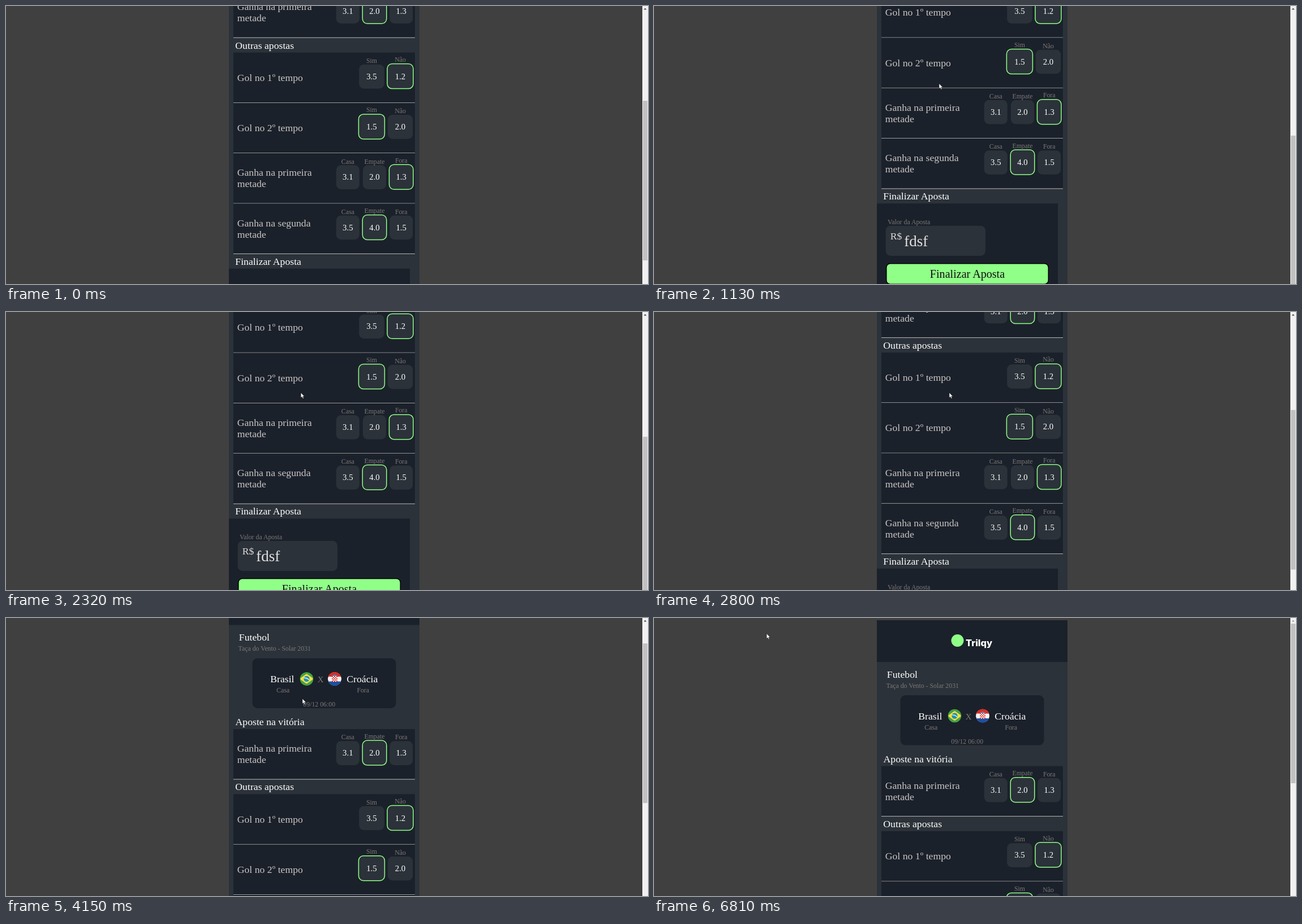
An HTML page for the animation above (6.89 s loop, 1135 px wide and 493 px high).

```html
<!DOCTYPE html>
<html lang="pt">
<head>
<meta charset="utf-8">
<style>
html, body { margin: 0; height: 100%; overflow: hidden; background: #404040; }
svg { display: block; width: 1135px; height: 493px; font-family: "Liberation Serif", "Times New Roman", serif; }
</style>
</head>
<body>
<svg viewBox="0 0 1135 493">
  <defs><clipPath id="disc"><circle r="12"/></clipPath></defs>
  <g id="page"></g>
  <rect x="1125" width="10" height="493" fill="#f1f1f1"/>
  <path id="arrow" d="M1127.5 6.5h5l-2.5-3z"/>
  <rect id="thumb" x="1126" width="8" height="283" fill="#c1c1c1"/>
  <path id="cursor" d="M0 0V9.2L2.1 7.3 3.6 10.6 5.2 9.9 3.7 6.7H6.5Z" fill="#fff" stroke="#111" stroke-width=".6"/>
</svg>
<script>
const $ = id => document.getElementById(id);
const DARK = '#1b212a', SLATE = '#2b3239', WHITE = '#fff', SOFT = '#c9c5c5', DIM = '#7b7878', LIME = '#90ff88', LINE = '#b9b9b9';
const BIG = 17.73, SMALL = 11.8, ODD = 14.78, PITCH = 89.3;
let out = '';

const rect = (x, y, w, h, fill, r = 0, more = '') =>
  out += `<rect x="${x}" y="${y}" width="${w}" height="${h}" rx="${r}" fill="${fill}" ${more}/>`;
const text = (x, y, str, size = BIG, fill = WHITE, anchor = 'start', more = '') =>
  out += `<text x="${x}" y="${y}" font-size="${size}" fill="${fill}" text-anchor="${anchor}" ${more}>${str}</text>`;
const label = (x, y, str) => text(x, y, str, SMALL, DIM, 'middle');
const flag = (x, art) =>
  out += `<g transform="translate(${x} 173.5)" clip-path="url(#disc)">${art}</g>`;

// One bet: title lines on the left, options set from the right edge
function row(top, lines, names, odds, picked) {
  const n = names.length, gap = n === 2 ? 50.6 : 47.2, w = n === 2 ? 44.5 : 41;
  rect(402, top, 321, PITCH - .4, DARK);
  rect(402, top + PITCH - .8, 321, 1, LINE);
  lines.forEach((s, i) => text(408.7, top + 50.2 + 20 * i - 10 * (lines.length - 1), s, BIG, SOFT));
  names.forEach((name, i) => {
    const on = i === picked;
    const x = (n === 2 ? 697 : 698.7) - gap * (n - 1 - i);
    if (on) rect(x - w / 2 - .75, top + 20.1, w + 1.5, 44, SLATE, 8.5, `stroke="${LIME}" stroke-width="1.5"`);
    else rect(x - w / 2, top + 21.2, w, 42.7, SLATE, 8.5);
    label(x, top + (on ? 16.6 : 18.4), name);
    text(x, top + 47.2, odds[i], ODD, WHITE, 'middle');
  });
}

// Header and match card
rect(394, 4, 337, 1000, SLATE);
rect(394, 4, 337, 74, DARK);
out += `<circle cx="536.5" cy="40" r="11" fill="${LIME}"/>`;
text(551, 49.5, 'Trilqy', 16.5, WHITE, 'start', 'font-family="Inter, sans-serif" font-weight="800"');
text(411.8, 106, 'Futebol');
text(410.6, 123.8, 'Taça do Vento - Solar 2031', SMALL, DIM);
rect(435.5, 137, 254, 88.6, DARK, 9);
text(467.2, 180, 'Brasil');
text(602.2, 180, 'Croácia');
text(556.2, 180, 'X', ODD, DIM, 'middle');
label(489.8, 198, 'Casa');
label(631.2, 198, 'Fora');
label(553.7, 223, '09/12 06:00');
flag(531.5, `<circle r="12" fill="#45a247"/>
  <path d="M-9 0L0-6.5 9 0 0 6.5Z" fill="#f6e03c" stroke="#f6e03c" stroke-width="4" stroke-linejoin="round"/>
  <circle r="5.2" fill="#2590b4"/><path d="M-5-1.6Q1-2 4.6 2.3" fill="none" stroke="#e8f4f0" stroke-width="1.3"/>`);
let checks = '';
for (let i = 0; i < 25; i++)
  checks += `<rect x="${i % 5 * 2 - 5}" y="${Math.floor(i / 5) * 2 - 5}" width="2" height="2" fill="${i % 2 ? WHITE : '#e0281f'}"/>`;
flag(581, `<circle r="12" fill="#f4f4f4"/><path d="M-12-12h24v8h-24z" fill="#e0281f"/>
  <path d="M-12 4.5h24V12h-24z" fill="#1d4fa3"/>${checks}<path d="M-5-5v-2l2 1 3-2 3 2 2-1v2z" fill="#4a90c8"/>`);

// Bets
const yesNo = ['Sim', 'Não'], sides = ['Casa', 'Empate', 'Fora'];
const firstHalf = ['Ganha na primeira', 'metade'], secondHalf = ['Ganha na segunda', 'metade'];
text(405.5, 256, 'Aposte na vitória');
row(262.6, firstHalf, sides, ['3.1', '2.0', '1.3'], 1);
text(405.3, 371, 'Outras apostas');
[
  [['Gol no 1º tempo'], yesNo, ['3.5', '1.2'], 1],
  [['Gol no 2º tempo'], yesNo, ['1.5', '2.0'], 0],
  [firstHalf, sides, ['3.1', '2.0', '1.3'], 2],
  [secondHalf, sides, ['3.5', '4.0', '1.5'], 1]
].forEach((bet, i) => row(378 + PITCH * i, ...bet));

// Checkout
text(405.3, 754.2, 'Finalizar Aposta');
rect(394, 761.2, 320, 148, DARK);
rect(393.5, 909, 320.5, 1, LINE);
text(413, 798.2, 'Valor da Aposta', SMALL, DIM);
rect(409.7, 800.8, 176.3, 53.2, SLATE, 8.5);
text(417.8, 825, 'R$', BIG, '#dedada');
text(442.3, 836.6, 'fdsf', 27, '#e4e0e0');
rect(410.8, 867.6, 286.5, 36.6, LIME, 7, 'stroke="#000" stroke-width="1.5"');
text(554, 892.8, 'Finalizar Aposta', 20.1, '#111', 'middle');
$('page').innerHTML = out;

// Scrolling: each wheel turn moves by some notches, eased, and is shown every TICK ms
const LOOP = 6890, NOTCH = 59.1, BOTTOM = 420.2, TICK = 77;
const turns = [ // start, length, notches
  [260, 390, 1], [890, 320, 1], [1530, 400, 1],
  [2230, 230, -1.5], [2720, 230, -1.5], [3440, 230, -1.5], [3920, 230, -1.5],
  [4480, 140, -1], [5030, 100, -1]
];
const moves = [ // pointer: start, end, x, y
  [1530, 1840, 520.5, 143], [1840, 4150, 524, 143], [5000, 5130, 500.5, 136.3],
  [5130, 5370, 389, 140], [5370, 5610, 557, 190], [5980, 6650, 224.5, 65], [6650, 6810, 199, 27.5]
];
const ease = p => p < .5 ? 4 * p ** 3 : 1 - 4 * (1 - p) ** 3;

function scrollAt(t) {
  let s = 5 * NOTCH;
  for (const [start, length, notches] of turns) {
    if (t < start) break;
    const last = Math.round(length / TICK);
    const step = Math.min(last, Math.floor((t - start) / TICK + .2));
    const to = Math.max(0, Math.min(BOTTOM, s + notches * NOTCH));
    s += (to - s) * (step === last ? 1 : ease((step + .42) / (last + .42)));
  }
  return s;
}

function pointerAt(t) {
  let x = 504, y = 137.5;
  for (const [start, end, u, v] of moves) {
    const p = Math.max(0, Math.min(1, (t - start) / (end - start)));
    x += (u - x) * p;
    y += (v - y) * p;
  }
  return [x, y];
}

function draw() {
  const t = performance.now() % LOOP, s = scrollAt(t);
  $('page').setAttribute('transform', `translate(0 ${-s})`);
  $('thumb').setAttribute('y', 10 + s * .535);
  $('arrow').setAttribute('fill', s > 0 ? '#505050' : '#a3a3a3');
  $('cursor').setAttribute('visibility', t < 260 ? 'hidden' : 'visible');
  $('cursor').setAttribute('transform', `translate(${pointerAt(t)})`);
  requestAnimationFrame(draw);
}
draw();
</script>
</body>
</html>
```
